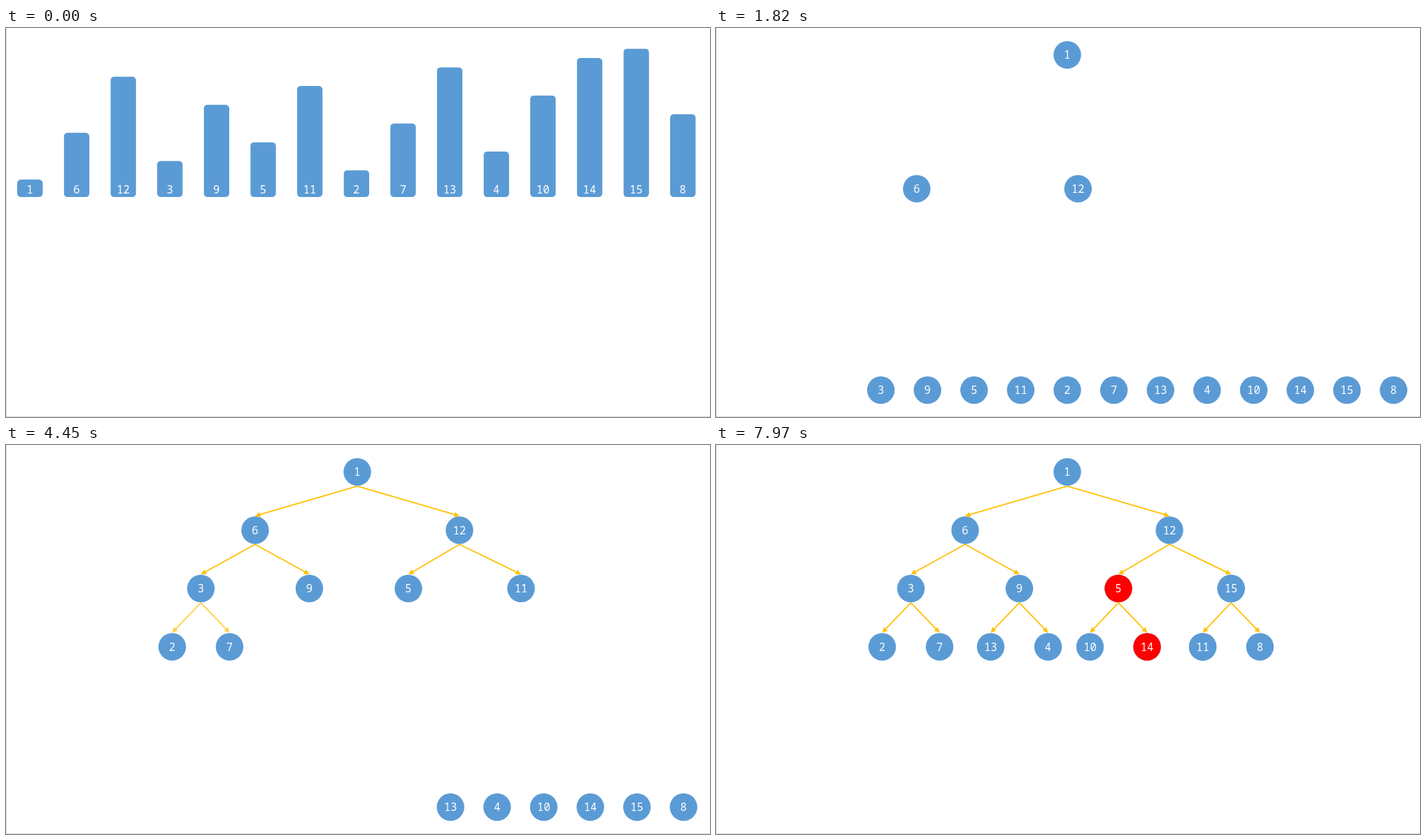
Recreate the animation shown at these times as an HTML page with a canvas. Size 1006x557 px, loop 8 s.

```html
<!DOCTYPE html>
<html lang="en">
<head>
<meta charset="utf-8">
<title>Building a heap</title>
<style>
  html, body { margin: 0; width: 100%; height: 100%; overflow: hidden; background: #fff; }
  canvas { display: block; }
</style>
</head>
<body>
<canvas id="stage" width="1006" height="557"></canvas>
<script>
const ctx = document.getElementById('stage').getContext('2d');
const BLUE = '#5b9bd5', RED = '#ff0000', GOLD = '#ffc000';
const LOOP = 8000, TICK = 100.7; // the picture advances once per tick
const R = 19.7, ROW_Y = 518.5;

const values = [1, 6, 12, 3, 9, 5, 11, 2, 7, 13, 4, 10, 14, 15, 8];
const treeX = [502, 356, 648, 278.5, 433.5, 575, 736,
  237.5, 319.5, 392.5, 474.5, 534.5, 616, 695.5, 777.3];

// Start and duration, in ticks, of the root's move and then of each pair of children
const moves = [[12.4, 2.8], [16.19, 2.87], [23.12, 2.59], [30.43, 2.6],
  [38, 2.1], [45.62, 2.7], [53.74, 3.18], [61, 2]];
// Tick at which each parent's arrows show first
const arrowTicks = [22, 29, 36, 44, 51, 59, 67];

const ramp = (n, start, length) => Math.min(1, Math.max(0, (n - start) / length));
const ease = p => p < 0.5 ? 2 * p * p : 1 - 2 * (1 - p) ** 2;
const mix = (a, b, p) => a + (b - a) * p;
const rowX = i => 35.8 + 66.6 * i;
const barTop = v => 217 - 13.4 * (v - 1);
const treeY = i => 38.5 + 83.5 * Math.floor(Math.log2(i + 1));

function label(text, x, y) {
  ctx.fillStyle = '#fff';
  ctx.fillText(text, x, y);
}

function bar(i, wiped) {
  const x = 16 + 66.64 * i, top = barTop(values[i]), height = 242 - top;
  ctx.save();
  ctx.beginPath();
  ctx.rect(x, top + height * wiped, 37, height);
  ctx.clip();
  ctx.fillStyle = BLUE;
  ctx.beginPath();
  ctx.roundRect(x, top, 36.5, height, 5.5);
  ctx.fill();
  label(values[i], x + 18.2, 237.4);
  ctx.restore();
}

function node(text, x, y, color, alpha) {
  if (!alpha) return;
  ctx.globalAlpha = alpha;
  ctx.fillStyle = color;
  ctx.beginPath();
  ctx.arc(x, y, R, 0, 2 * Math.PI);
  ctx.fill();
  label(text, x, y + 5.9);
  ctx.globalAlpha = 1;
}

function arrow(from, to, alpha) {
  const x = treeX[from], y = treeY(from) + 20.3;
  const tipX = treeX[to], tipY = treeY(to) - 20.3;
  const length = Math.hypot(tipX - x, tipY - y);
  ctx.save();
  ctx.globalAlpha = alpha;
  ctx.strokeStyle = ctx.fillStyle = GOLD;
  ctx.lineWidth = 1.8;
  ctx.translate(x, y);
  ctx.rotate(Math.atan2(tipY - y, tipX - x));
  ctx.beginPath();
  ctx.moveTo(0, 0);
  ctx.lineTo(length - 7, 0);
  ctx.stroke();
  ctx.beginPath();
  ctx.moveTo(length, 0);
  ctx.lineTo(length - 7.5, -3.8);
  ctx.lineTo(length - 7.5, 3.8);
  ctx.fill();
  ctx.restore();
}

function position(i, n) {
  const fall = ease(ramp(n, 8.93, 2.4));
  const climb = ease(ramp(n, ...moves[(i + 1) >> 1]));
  const y = mix(barTop(values[i]) + R, ROW_Y, fall);
  return [mix(rowX(i), treeX[i], climb), mix(y, treeY(i), climb)];
}

function draw(n) {
  ctx.fillStyle = '#fff';
  ctx.fillRect(0, 0, 1006, 557);
  ctx.fillStyle = '#d9d9d9';
  ctx.fillRect(0, 0, 1, 557);
  ctx.fillRect(0, 556, 1006, 1);
  ctx.font = '15.5px "Noto Sans Mono", "DejaVu Sans Mono", monospace';
  ctx.textAlign = 'center';

  const change = ramp(n, 2, 6);
  const swap = ramp(n, 73, 3);

  if (change < 1) values.forEach((v, i) => bar(i, change));

  arrowTicks.forEach((tick, parent) => {
    const alpha = ramp(n, tick - 0.98, 1.3);
    for (const child of [2 * parent + 1, 2 * parent + 2]) {
      const redrawn = parent === 6 || child === 6;
      if (alpha) arrow(parent, child, redrawn ? alpha - swap * (1 - swap) : alpha);
    }
  });

  values.forEach((v, i) => node(v, ...position(i, n), BLUE, change));

  // Compare and swap the pair 11 / 15, then compare 5 / 14
  const mark = (i, v, color, alpha) => node(v, treeX[i], treeY(i), color, alpha);
  const first = ramp(n, 69.2, 2.5), second = ramp(n, 76.2, 2.6);
  if (swap < 1) for (const i of [6, 13]) mark(i, values[i], RED, first);
  mark(6, 15, BLUE, swap);
  mark(13, 11, BLUE, swap);
  for (const i of [5, 12]) mark(i, values[i], RED, second);
}

const begin = performance.now();
function frame() {
  const t = (performance.now() - begin) % LOOP;
  draw(Math.floor((t + 10) / TICK));
  requestAnimationFrame(frame);
}
frame();
</script>
</body>
</html>
```
